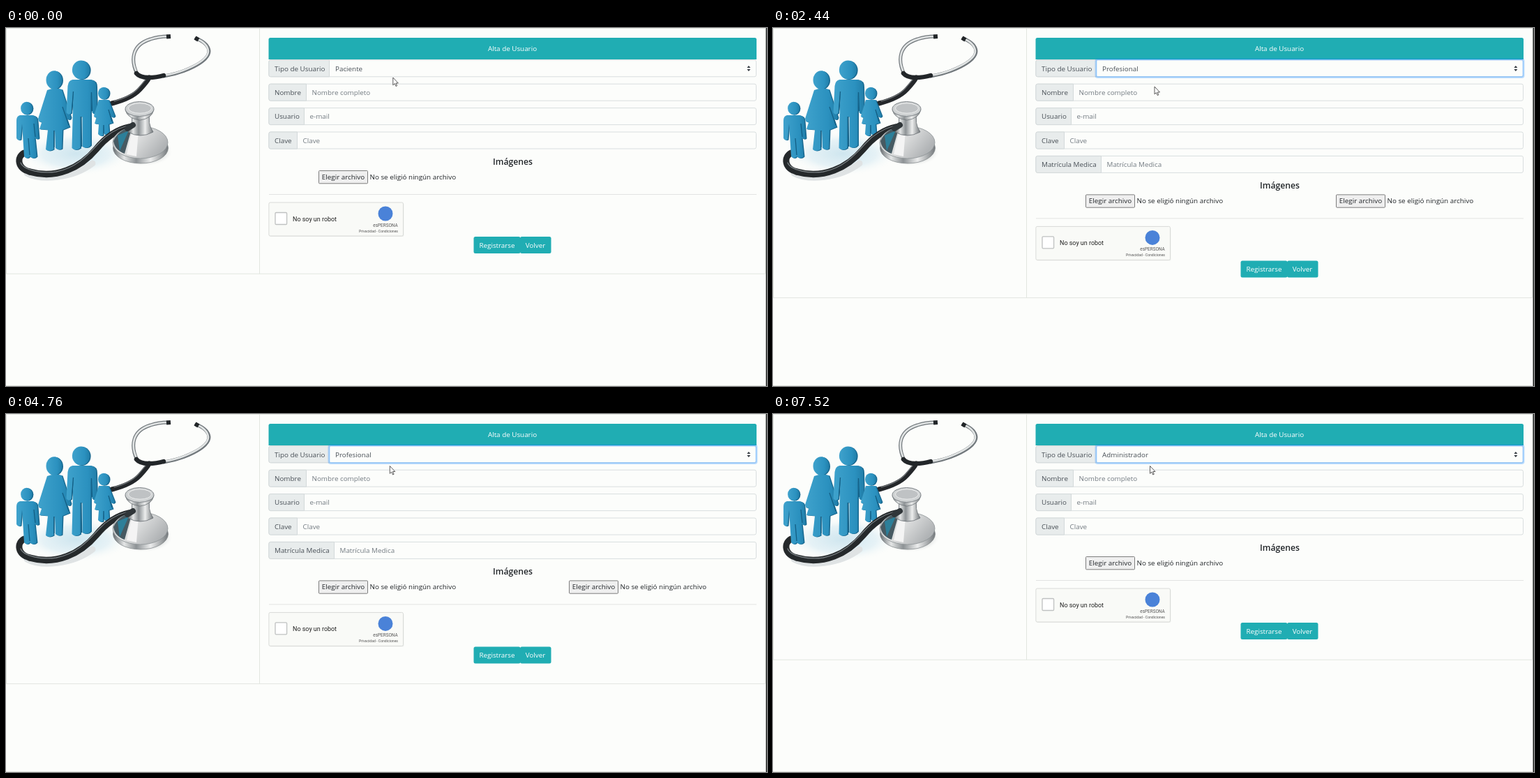
Animation of 1091x513 px, one loop 8000 ms. Source, as an HTML page:

```html
<!DOCTYPE html>
<html lang="es">
<head>
<meta charset="utf-8">
<title>Alta de Usuario</title>
<style>
  html, body { margin: 0; width: 100%; height: 100%; overflow: hidden; background: #fcfdfb; }
  svg { display: block; width: 100%; height: 100%; }
  text { font: 9.85px "Open Sans", "Noto Sans", sans-serif; fill: #495057; }
  .hint { fill: #737b82; }
  .white { fill: #fff; }
  .mid { text-anchor: middle; }
  .title { font-size: 12.2px; font-weight: 600; fill: #212529; }
  .dark { fill: #212529; }
  .captcha text { font-family: Roboto, sans-serif; fill: #555; }
  .teal { fill: #20adb3; }
  .box { fill: #fcfdfb; stroke: #d9dedf; }
  .addon { fill: #e8ecec; stroke: #d3d9da; }
  .rule { fill: none; stroke: #e2e6e0; }
  .tube { fill: none; stroke-linecap: round; stroke-linejoin: round; }
</style>
</head>
<body>
<svg viewBox="0 0 1091 513" preserveAspectRatio="none">
  <defs>
    <linearGradient id="blue">
      <stop offset="0" stop-color="#3fa2cc"/><stop offset=".7" stop-color="#2b91bf"/><stop offset="1" stop-color="#217ea9"/>
    </linearGradient>
    <linearGradient id="steel">
      <stop offset="0" stop-color="#656b6f"/><stop offset=".2" stop-color="#e4e6e6"/><stop offset=".42" stop-color="#8d9295"/>
      <stop offset=".68" stop-color="#eceded"/><stop offset="1" stop-color="#74797c"/>
    </linearGradient>
    <linearGradient id="disc" x2="1" y2=".5">
      <stop offset="0" stop-color="#b4b8ba"/><stop offset=".45" stop-color="#e3e4e4"/><stop offset="1" stop-color="#b0b3b5"/>
    </linearGradient>
    <radialGradient id="floor">
      <stop offset="0" stop-color="#cfe6ef"/><stop offset=".6" stop-color="#e6f2f6"/><stop offset="1" stop-color="#fcfdfb" stop-opacity="0"/>
    </radialGradient>
    <radialGradient id="shade">
      <stop offset=".5" stop-color="#a2a8ab"/><stop offset="1" stop-color="#fcfdfb" stop-opacity="0"/>
    </radialGradient>
    <g id="family">
      <g transform="translate(1)">
        <ellipse cx="68" cy="74.500" rx="11.500" ry="13.200"/>
        <path d="M58 89Q68 85 79 88L92 128Q91 134 86 130L80 113L90 142L80 146L79 173Q74 176 70 172L69 147L67 147V174Q60 178 56 174L59 146L47 145L58 111L51 134Q46 137 45 130Z"/>
      </g>
      <g transform="translate(1.500)">
        <ellipse cx="106" cy="60" rx="12.600" ry="13.500"/>
        <path d="M94 74H120Q128 75 128 84L129 121Q126 126 122 121L120 91L120 168Q115 174 108 170V127H105L105 172Q98 177 93 172L95 90L92 122Q88 126 85 121L87 83Q88 75 94 74Z"/>
      </g>
      <ellipse cx="29.500" cy="115" rx="8.400" ry="9.300"/>
      <path d="M20 125H38Q45 126 45 133L47 158Q44 161 41 157L39 136L44 184Q39 189 34 184L32 158L34 184Q30 189 26 184L23 137L21 160Q17 162 15 158V133Q15 126 20 125Z"/>
      <g transform="translate(1)">
        <ellipse cx="139" cy="93.500" rx="8" ry="8.800"/>
        <path d="M132 103H146L155 126Q153 130 150 127L145 116L152 136L146 138L147 152Q143 155 140 152L139 139L138 154Q134 156 131 152L132 138L126 137L132 116L129 127Q126 130 125 126Z"/>
      </g>
    </g>
  </defs>

  <!-- Family and stethoscope -->
  <g id="picture">
    <ellipse cx="100" cy="180" rx="80" ry="32" fill="url(#floor)"/>
    <ellipse cx="197" cy="178" rx="42" ry="20" fill="url(#shade)"/>
    <path class="tube" d="M30 208C50 219 95 216 124 194" stroke="#dfe3e4" stroke-width="9"/>
    <g class="tube">
      <path d="M152 108Q180 101 192 88T205 71" stroke="#24272a" stroke-width="7"/>
      <path d="M155 105Q180 98 190 86T202 72" stroke="#6d7275" stroke-width="1.2"/>
      <path d="M188 66C178 45 181 24 207 16Q219 12 232 12M226 69C253 65 291 49 291 33Q290 22 273 15" stroke="#70777b" stroke-width="5"/>
      <path d="M188 65C178 45 181 24 207 16Q219 12 232 12M226 68C253 64 290 48 290 33Q289 22 273 15" stroke="#e1e4e4" stroke-width="2.6"/>
      <path d="M187 65Q192 71 204 71T226 68" stroke="#222629" stroke-width="6.5"/>
      <path d="M230 12.5L236 12M271 14L276 17" stroke="#222629" stroke-width="6" stroke-linecap="butt"/>
    </g>
    <path class="tube" d="M26 179C15 185 16 201 34 206" stroke="#25292b" stroke-width="9"/>

    <use href="#family" x="1.500" y=".5" fill="#17678f"/>
    <use href="#family" fill="url(#blue)"/>
    <g fill="none" stroke="#135f85" stroke-width="1.300">
      <path d="M69 147V171M108 127L108.500 170M32 158L34 182M140 139V151M122.500 92L123.500 119M96.500 91L94.500 118M81 113L90 139M40 137L42 156M147 117L152 134"/>
    </g>

    <g class="tube">
      <path d="M34 206C72 217 107 200 129 174Q151 147 177 142" stroke="#25292b" stroke-width="9.500"/>
      <path d="M21 193C25 204 52 209 72 206C103 200 119 180 134 164Q150 147 174 140" stroke="#777d80" stroke-width="1.300"/>
    </g>

    <ellipse cx="193" cy="172" rx="39.500" ry="22" fill="url(#steel)" stroke="#7d8386" stroke-width=".7"/>
    <ellipse cx="192.500" cy="164" rx="39.500" ry="23" fill="url(#disc)" stroke="#8c9295" stroke-width=".8"/>
    <path d="M154 162Q161 146 181 141L170 180Q156 175 154 162Z" fill="#475a62"/>
    <path d="M160 154L176 147L163 176Z" fill="#2d7f99"/>
    <path d="M181 145L173 181L187 184L190 146Z" fill="#f4f4f4"/>
    <path d="M179 121Q184 136 175 149Q192 159 211 149Q202 136 207 121Z" fill="url(#steel)" stroke="#666d71" stroke-width=".8"/>
    <path d="M171 117Q174 130 192 132Q209 130 212 117Z" fill="url(#steel)" stroke="#6c7377" stroke-width=".8"/>
    <ellipse cx="191.500" cy="116" rx="20.500" ry="10.500" fill="#cfd2d3" stroke="#7f8589"/>
    <ellipse cx="192" cy="115" rx="16.500" ry="7.200" fill="#bfc2c4" stroke="#eceded"/>
    <path class="tube" d="M174 144L182 139" stroke="#303639" stroke-width="8"/>
  </g>

  <path id="frame" class="rule"/>
  <path class="rule" d="M0 512.500H1088"/>
  <rect x="1089.500" width="1.500" height="513" fill="#202322"/>

  <!-- Form -->
  <path class="teal" d="M376.500 45V16.500Q376.500 14 379 14H1073.500Q1076 14 1076 16.500V45Z"/>
  <text class="white mid" x="726" y="33">Alta de Usuario</text>
  <g id="fields"></g>
  <rect id="glow" x="463" y="45" width="613" height="25.500" rx="2.500" fill="none" stroke="#007bff" stroke-opacity=".25" stroke-width="3"/>
  <rect id="focus" x="463.500" y="45.500" width="612" height="24.500" rx="2" fill="none" stroke="#8ec4fb"/>
  <text id="choice" x="472" y="61.500"></text>
  <path d="M1062.300 57L1064.800 54L1067.300 57ZM1062.300 59L1064.800 62L1067.300 59Z" fill="#343a40"/>

  <g id="lower">
    <text class="title mid" x="726.500" y="196">Imágenes</text>
    <g id="files"></g>
    <path d="M377 238.500H1076" stroke="#000" stroke-opacity=".1"/>
    <g class="captcha">
      <rect x="377.500" y="251" width="193" height="48" rx="2" fill="#000" opacity=".06"/>
      <rect x="376.900" y="250" width="192.600" height="48" rx="2" fill="#f9faf7" stroke="#d9dbd8"/>
      <rect x="386" y="264.500" width="16.600" height="17" rx="1.300" fill="#fff" stroke="#bfc1c1" stroke-width="1.300"/>
      <text x="411" y="276.500" style="font-size:8.960px;fill:#222">No soy un robot</text>
      <circle cx="544" cy="266" r="10.500" fill="#4a82d8"/>
      <text class="mid" x="544" y="285" style="font-size:6.400px">esPERSONA</text>
      <text class="mid" x="534" y="292.500" style="font-size:5.120px">Privacidad - Condiciones</text>
    </g>
    <rect class="teal" x="670.500" y="299" width="67" height="24" rx="2.500"/>
    <rect class="teal" x="737" y="299" width="44.500" height="24" rx="2.500"/>
    <text class="white mid" x="704" y="314.500">Registrarse</text>
    <text class="white mid" x="759" y="314.500">Volver</text>
  </g>

  <g id="pointer">
    <circle id="click" r="1.600" fill="#e0564c" opacity=".6"/>
    <path d="M0 0V10.800L2.500 8.600L4.200 12.500L5.800 11.800L4.200 8H7.500Z" fill="#fff" stroke="#333" stroke-width=".8"/>
  </g>
</svg>
<script>
const LOOP = 8000, ROW = 34.4;
const el = id => document.getElementById(id);

const field = (label, hint, y, split, id) => `
  <g id="${id}">
    <rect class="box" x="376.9" y="${y}" width="698.6" height="24" rx="2.5"/>
    <path class="addon" d="M${split} ${y}H379.4Q376.9 ${y} 376.9 ${y + 2.5}V${y + 21.5}Q376.9 ${y + 24} 379.4 ${y + 24}H${split}Z"/>
    <text x="385" y="${y + 15.7}">${label}</text>
    <text class="hint" x="${split + 8}" y="${y + 15.7}">${hint}</text>
  </g>`;

el('fields').innerHTML = [
  ['Tipo de Usuario', '', 463.5],
  ['Nombre', 'Nombre completo', 430.5],
  ['Usuario', 'e-mail', 427.5],
  ['Clave', 'Clave', 417.5],
  ['Matrícula Medica', 'Matrícula Medica', 470.5]
].map(([label, hint, split], i) => field(label, hint, 45.8 + i * ROW, split, 'field' + i)).join('');

const filePicker = (x, id) => `
  <g id="${id}" transform="translate(${x})">
    <rect x=".5" y="204.5" width="70" height="18.3" rx="1" fill="#efefef" stroke="#7d7d7d"/>
    <text class="dark mid" x="35.5" y="217">Elegir archivo</text>
    <text class="dark" x="73.5" y="217">No se eligió ningún archivo</text>
  </g>`;
el('files').innerHTML = filePicker(448, 'file1') + filePicker(807, 'file2');

// Pointer stops: time, x, y
const track = [
  [0, 554.8, 71], [720, 554.8, 71], [920, 536, 65.5], [1160, 536, 65.5],
  [1520, 540.5, 73], [2360, 540.5, 73], [2400, 547, 84], [2840, 547, 84],
  [3280, 550.3, 62], [4080, 550.3, 62], [4680, 550.3, 74.5], [5440, 550.3, 74.5],
  [5480, 545, 92], [5720, 545, 92], [6120, 540.5, 74.5], [LOOP, 540.5, 74.5]
];
const smooth = p => p * p * (3 - 2 * p);

function pointerAt(t) {
  const i = track.findIndex(stop => stop[0] > t);
  const [t0, x0, y0] = track[i - 1], [t1, x1, y1] = track[i];
  const p = smooth((t - t0) / (t1 - t0));
  return [x0 + (x1 - x0) * p, y0 + (y1 - y0) * p];
}

const show = (id, on) => el(id).setAttribute('visibility', on ? 'visible' : 'hidden');

function draw(now) {
  const t = now % LOOP;
  const doctor = t >= 2360 && t < 5440;
  const shift = doctor ? ROW : 0;
  const bottom = 352.2 + shift;
  const focus = Math.min(1, Math.max(0, (t - 800) / 150));

  el('choice').textContent = t < 2360 ? 'Paciente' : doctor ? 'Profesional' : 'Administrador';
  show('field4', doctor);
  show('file2', doctor);
  show('click', t >= 880 && t < 1040);
  el('focus').setAttribute('opacity', focus);
  el('glow').setAttribute('opacity', focus);
  el('lower').setAttribute('transform', `translate(0 ${shift})`);
  el('frame').setAttribute('d', `M.5 .5H1088.5V${bottom}H.5ZM363.5 .5V${bottom}`);
  el('pointer').setAttribute('transform', `translate(${pointerAt(t)})`);
}

const start = performance.now();
function tick() {
  draw(performance.now() - start);
  requestAnimationFrame(tick);
}
tick();
</script>
</body>
</html>
```
